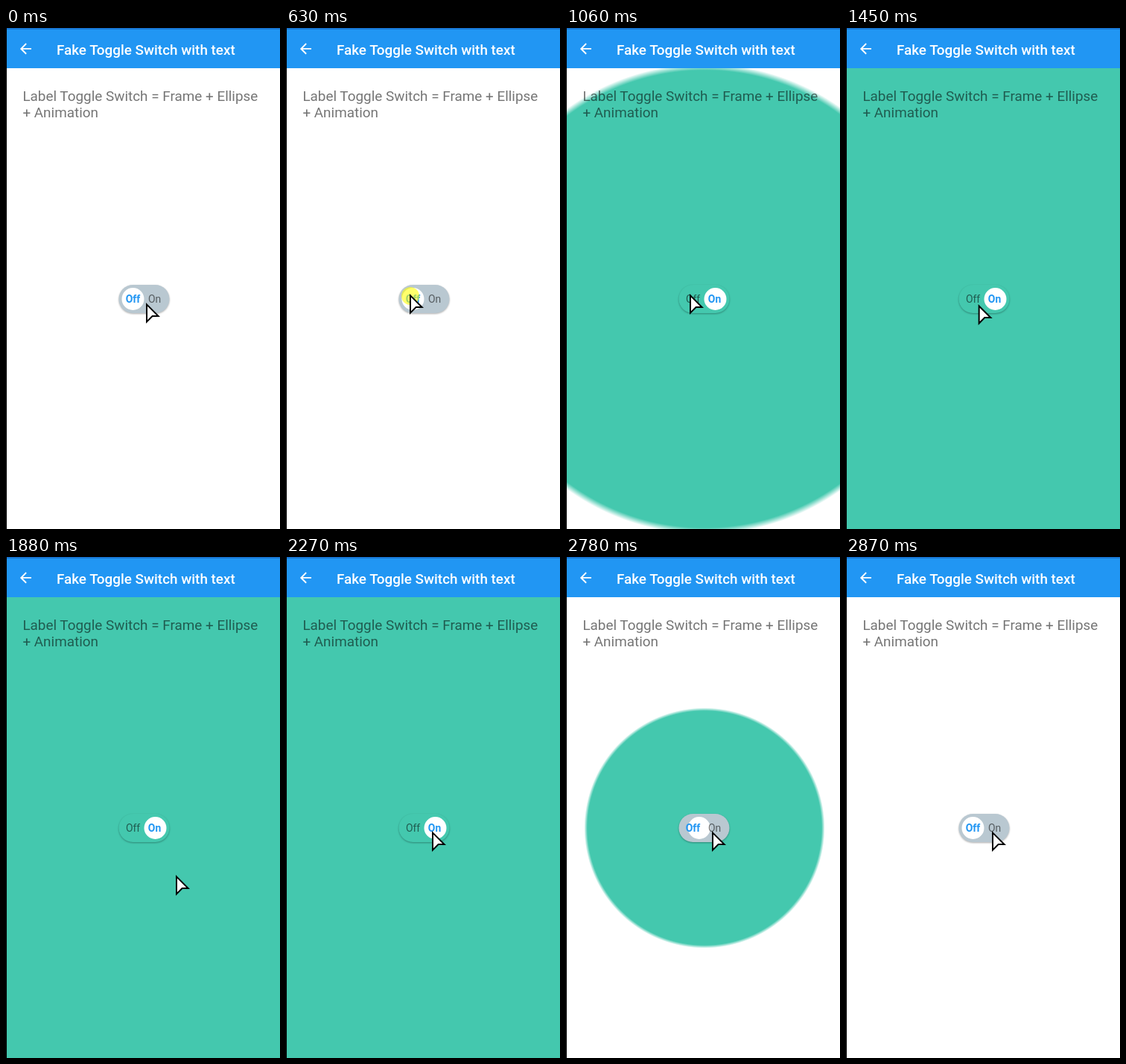
These frames come from a looping animation (368 px wide and 673 px high, 3.95 s). An HTML page:

```html
<!DOCTYPE html>
<html lang="en">
<head>
<meta charset="utf-8">
<title>Toggle switch</title>
<style>
  html, body { margin: 0; width: 100%; height: 100%; overflow: hidden; background: #fff; }
  svg { display: block; font-family: Roboto, "Liberation Sans", sans-serif; }
  .title { font-size: 18.9px; font-weight: 500; fill: #fff; }
  .label { font-size: 18.9px; fill: rgba(0, 0, 0, .54); }
  .option { font-size: 13.9px; text-anchor: middle; fill: rgba(0, 0, 0, .54); }
  .option.active { font-weight: 700; fill: #2196f3; }
  #track { fill: #b9c8d1; filter: drop-shadow(0 1px 1.2px rgba(0, 0, 0, .32)); }
  #track.on { fill: #44c8ae; }
</style>
</head>
<body>
<svg width="368" height="673" viewBox="0 0 368 673">
  <defs>
    <radialGradient id="soft">
      <stop offset=".973" stop-color="#44c8ae"/>
      <stop offset="1" stop-color="#44c8ae" stop-opacity="0"/>
    </radialGradient>
  </defs>
  <rect width="368" height="673" fill="#fff"/>
  <circle id="ripple" cx="186" cy="364" r="0" fill="url(#soft)"/>

  <rect width="368" height="54" fill="#2196f3"/>
  <rect width="368" height="2" fill="#1976d2"/>
  <path transform="translate(15.2 16.6) scale(.94)" fill="#fff"
    d="M20 11H7.83l5.59-5.59L12 4l-8 8 8 8 1.41-1.41L7.83 13H20z"/>
  <text class="title" x="67.9" y="36">Fake Toggle Switch with text</text>
  <text class="label" x="22.4" y="98">Label Toggle Switch = Frame + Ellipse</text>
  <text class="label" x="22.4" y="120">+ Animation</text>

  <rect id="track" x="151.5" y="345" width="68" height="38" rx="19"/>
  <circle id="thumb" cx="170.5" cy="364" r="15" fill="#fff"/>
  <text id="off" class="option" x="170.5" y="369">Off</text>
  <text id="on" class="option" x="199.5" y="369">On</text>

  <rect width="1" height="673" fill="#000"/>
  <circle id="press" r="12" fill="#ff0" fill-opacity=".58"/>
  <path id="cursor" d="M1 2.4L16.6 18H8.6L1 25.6z" fill="#fff" stroke="#000" stroke-width="2"/>
</svg>
<script>
  const LOOP = 3950;
  const OPEN = [820, 900, 970, 1020, 1060, 1110];
  const CLOSE = [2650, 2700, 2740, 2780, 2820, 2870];
  const FULL = 395;

  // start, end, steps, from, to
  const MOVES = [
    [30, 250, 6, [188, 369], [166, 357]],
    [1360, 1690, 7, [166, 357], [228, 432]],
    [1880, 1880, 1, [228, 432], [228, 427]],
    [1936, 2270, 7, [228, 427], [196, 368]]
  ];

  const [ripple, track, thumb, off, on, press, cursor] =
    ["ripple", "track", "thumb", "off", "on", "press", "cursor"].map(id => document.getElementById(id));

  const clamp = v => Math.min(1, Math.max(0, v));
  const ease = p => (1 - Math.cos(Math.PI * p)) / 2;
  const held = (t, times) => times.filter(s => s <= t).pop();

  function cursorAt(t) {
    const [start, end, steps, from, to] = MOVES.filter(m => m[0] <= t).pop() || MOVES[0];
    if (t < start) return from;
    const gap = (end - start) / (steps - 1) || 1;
    const p = ease(clamp((Math.floor((t - start) / gap + 1e-6) + 1) / steps));
    return from.map((v, i) => v + (to[i] - v) * p);
  }

  function switchAt(t) {
    if (t < OPEN[0]) return { r: 0, x: 0 };
    if (t < CLOSE[0]) {
      const h = held(t, OPEN);
      return { r: FULL * clamp((h - 861) / 249), x: clamp((h - 820) / 180) };
    }
    const d = held(t, CLOSE) - CLOSE[0];
    return { r: FULL * (1 - d / 220), x: 1 - clamp(d / 180) };
  }

  function render(t) {
    const isOn = t >= OPEN[0] && t < CLOSE[0];
    const { r, x } = switchAt(t);
    ripple.setAttribute("r", r);
    thumb.setAttribute("cx", 170.5 + 30 * x);
    track.classList.toggle("on", isOn);
    on.classList.toggle("active", isOn);
    off.classList.toggle("active", !isOn);

    const [cx, cy] = cursorAt(t);
    cursor.setAttribute("transform", `translate(${cx} ${cy})`);
    press.setAttribute("transform", `translate(${cx + 1} ${cy + 3})`);
    const pressed = (t >= 630 && t < 820) || (t >= 2460 && t < 2650);
    press.setAttribute("visibility", pressed ? "visible" : "hidden");
  }

  const begin = performance.now();
  function tick() {
    render((performance.now() - begin) % LOOP);
    requestAnimationFrame(tick);
  }
  render(0);
  requestAnimationFrame(tick);
</script>
</body>
</html>
```
